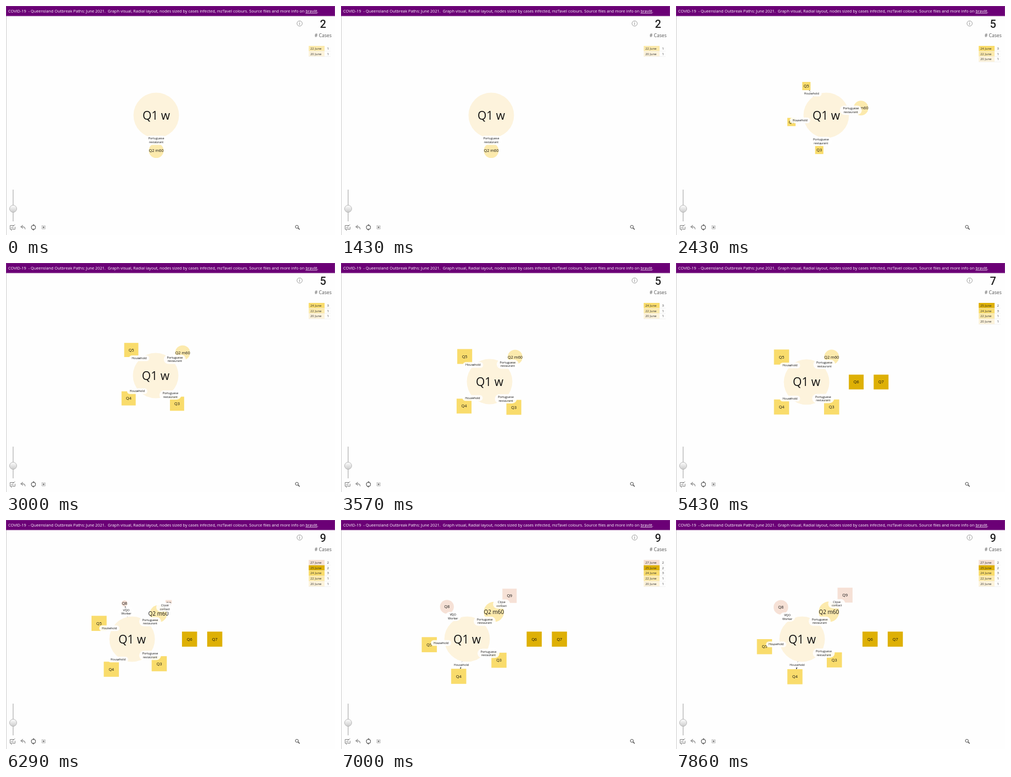
An HTML page for the animation above (8000 ms loop, 600x419 px).

```html
<!DOCTYPE html>
<html lang="en">
<head>
<meta charset="utf-8">
<title>Outbreak paths</title>
<style>
  html, body { margin: 0; width: 100%; height: 100%; overflow: hidden; background: #fefefe; }
  svg { display: block; width: 600px; height: 419px; font-family: "Open Sans", "Noto Sans", sans-serif; }
  .mid { text-anchor: middle; }
</style>
</head>
<body>
<svg id="stage" viewBox="0 0 600 419">
  <rect width="600" height="419" fill="#fefefe"/>
  <path d="M.5 18V419" stroke="#ccc"/>
  <g id="graph"></g>

  <rect x=".5" y=".5" width="599" height="17.5" fill="#6b0076" stroke="#7c2586"/>
  <text x="4" y="11.8" font-size="7.38" fill="#fff" xml:space="preserve">COVID-19&#160; - Queensland Outbreak Paths: June 2021.&#160; Graph visual, Radial layout, nodes sized by cases infected, mzTavel colours. Source files and more info on <tspan text-decoration="underline">bravlit</tspan>.</text>

  <text id="count" class="mid" x="578.3" y="40" font-family="Roboto, sans-serif" font-size="20" font-weight="500" fill="#222"></text>
  <text class="mid" x="578.3" y="57.3" font-size="8.6" fill="#555">#&#160;Cases</text>
  <g id="legend" font-size="5.9" fill="#333"></g>

  <defs>
    <linearGradient id="knob" x2="0" y2="1">
      <stop offset="0" stop-color="#fff"/><stop offset="1" stop-color="#ccc"/>
    </linearGradient>
  </defs>
  <path d="M13 336V394" stroke="#ccc" stroke-width="2"/>
  <circle cx="13" cy="371" r="6.5" fill="url(#knob)" stroke="#aaa" stroke-width=".8"/>

  <g fill="none" stroke="#777">
    <circle cx="535.5" cy="32" r="4.8" stroke-width=".7"/>
    <path d="M535.5 31v3.500M535.5 29v1" stroke-width=".8"/>
    <path d="M7.5 401.5h7M16.5 404v4.500h-5l-2 2v-2h-2v-7M9 406h5M11.500 404l5-4" stroke-width=".9"/>
    <path d="M31 401l-4 3 4 3M27.500 404h3q4 0 4.500 4.500" stroke="#999" stroke-width="1.3"/>
    <path d="M47 407.500a4 4 0 0 1 3-6.500M53 402.500a4 4 0 0 1-3 6.500M49 409a4 4 0 0 1-2-1.500M51 401a4 4 0 0 1 2 1.500" stroke="#555" stroke-width="1.2"/>
    <rect x="65.500" y="402" width="6" height="6" stroke="#999" stroke-dasharray="1.5 .8"/>
    <circle cx="530.500" cy="404" r="2.700" stroke="#444"/>
    <path d="M532.500 406l3 3" stroke="#444" stroke-width="1.4"/>
  </g>
  <path d="M49.500 399l2.500 2-2.500 2zM50.500 407l-2.500 2 2.500 2z" fill="#555"/>
  <rect x="67" y="403.500" width="3" height="3" fill="#888"/>
</svg>

<script>
const LOOP = 8000, FRAME = 1000 / 7, TAU = 290;
const starts = [-4000, 2200, 4300, 6130];
const counts = [2, 5, 7, 9];
const color = { d20: '#fdf3dc', d22: '#fceaad', d24: '#f9dc6c', d25: '#deb005', d27: '#f6e1d6' };

// Camera: centre of the first node and the span of each pan.
const pans = [
  { from: 2800, to: 3300, x: 271, y: 217 },
  { from: 5000, to: 5600, x: 230, y: 218 }
];

// Tracks hold one entry per step: a constant or [from, to].
const orbit = [64.6, , , [64.6, 70]];
const restaurant = ['Portuguese', 'restaurant'];
const nodes = [
  { text: 'Q1 w', birth: 0, fill: color.d20, round: true, size: [41.5], font: [21] },
  { text: 'Q2 m60', birth: 0, fill: color.d22, round: true, parent: 0, label: restaurant,
    angle: [90, [28, -45], , [-43, -45.7]], dist: orbit, size: [13.5, , , [13.5, 18.7]], font: [7.34, , , 10] },
  { text: 'Q3', birth: 1, fill: color.d24, parent: 0, label: restaurant,
    angle: [, [169, 45], , [49, 32.8]], dist: orbit, size: [, [0, 13.8]] },
  { text: 'Q4', birth: 1, fill: color.d24, parent: 0, label: ['Household'],
    angle: [, [210, 135], , [141.5, 100.7]], dist: orbit, size: [, [0, 13.8]] },
  { text: 'Q5', birth: 1, fill: color.d24, parent: 0, label: ['Household'],
    angle: [, [249, 225], , [232, 168.5]], dist: orbit, size: [, [0, 13.8]] },
  { text: 'Q6', birth: 2, fill: color.d25, parent: 0,
    angle: [0], dist: [, , [71, 91], [91, 124]], size: [, , [0, 13.8]] },
  { text: 'Q7', birth: 2, fill: color.d25, parent: 5,
    angle: [0], dist: [, , [11, 46]], size: [, , [0, 13.8]] },
  { text: 'Q8', birth: 3, fill: color.d27, round: true, parent: 0, label: ['VQO', 'Worker'],
    angle: [, , , [273.4, 236.3]], dist: orbit, size: [, , , [0, 13.3]] },
  { text: 'Q9', birth: 3, fill: color.d27, parent: 1, label: ['Close', 'contact'],
    angle: [-46], dist: [, , , [15.7, 42.4]], size: [, , , [0, 13.7]] }
];

const dates = [
  { text: '27 June', cases: 2, birth: 3, fill: color.d27 },
  { text: '25 June', cases: 2, birth: 2, fill: color.d25 },
  { text: '24 June', cases: 3, birth: 1, fill: color.d24 },
  { text: '22 June', cases: 1, birth: 0, fill: color.d22 },
  { text: '20 June', cases: 1, birth: 0, fill: color.d20 }
];

const $ = id => document.getElementById(id);

function make(parent, tag, attrs = {}, text) {
  const el = document.createElementNS('http://www.w3.org/2000/svg', tag);
  set(el, attrs);
  if (text !== undefined) el.textContent = text;
  return parent.appendChild(el);
}

function set(el, attrs) {
  for (const name in attrs) el.setAttribute(name, attrs[name]);
}

const show = (el, on) => { el.style.display = on ? '' : 'none'; };
const move = (x, y) => `translate(${x.toFixed(2)} ${y.toFixed(2)})`;

function track(values, step, t) {
  let s = step;
  while (values[s] === undefined) s--;
  const value = values[s];
  if (!Array.isArray(value)) return value;
  const [from, to] = value;
  return to + (from - to) * Math.exp(-(t - starts[s]) / TAU);
}

function camera(t) {
  let x = 274, y = 200;
  for (const pan of pans) {
    const p = Math.min(1, Math.max(0, (t - pan.from) / (pan.to - pan.from)));
    const k = p * p * (3 - 2 * p);
    x += (pan.x - x) * k;
    y += (pan.y - y) * k;
  }
  return { x, y };
}

function build() {
  const [discs, edges, labels] = [0, 0, 0].map(() => make($('graph'), 'g'));
  for (const node of nodes) {
    node.group = make(discs, 'g');
    node.shape = node.round
      ? make(node.group, 'circle', { r: 1, fill: node.fill })
      : make(node.group, 'rect', { x: -1, y: -1, width: 2, height: 2, fill: node.fill });
    node.caption = make(node.group, 'text', { class: 'mid', dy: '.36em', fill: '#111' }, node.text);
    if (!node.label) continue;

    node.edge = make(edges, 'g');
    node.line = make(node.edge, 'path', { stroke: '#555', 'stroke-width': .6 });
    node.head = make(node.edge, 'path', { d: 'M0 0L-4.5 -2.2V2.2Z', fill: '#111' });

    node.tag = make(labels, 'g', { 'font-size': 5.4 });
    const lines = node.label.length;
    const width = Math.max(...node.label.map(line => line.length)) * 2.9 + 11;
    const height = lines * 6.5 + 4;
    make(node.tag, 'rect', {
      x: -width / 2, y: -height / 2, width, height, rx: height / 2, fill: '#fff', 'fill-opacity': .88
    });
    node.label.forEach((line, i) => make(node.tag, 'text', {
      class: 'mid', y: (i - (lines - 1) / 2) * 6.5 + 1.9, fill: '#111'
    }, line));
  }
  for (const date of dates) {
    date.group = make($('legend'), 'g');
    make(date.group, 'rect', { x: 552, width: 29, height: 9.5, fill: date.fill });
    make(date.group, 'path', { d: 'M552 9.6H592', stroke: '#ddd', 'stroke-width': .4 });
    make(date.group, 'text', { x: 555, y: 6.9 }, date.text);
    make(date.group, 'text', { class: 'mid', x: 587.3, y: 6.9 }, date.cases);
  }
}

// Distance from a node's centre to its outline in the given direction.
function reach(node, angle) {
  return node.round ? node.r : node.r / Math.max(Math.abs(Math.cos(angle)), Math.abs(Math.sin(angle)));
}

function drawNode(node, step, t) {
  const on = step >= node.birth;
  for (const el of [node.group, node.edge, node.tag]) if (el) show(el, on);
  if (!on) return;

  node.r = track(node.size, step, t);
  const parent = nodes[node.parent];
  if (parent) {
    const angle = track(node.angle, step, t) * Math.PI / 180;
    const dist = track(node.dist, step, t);
    const along = d => [parent.x + d * Math.cos(angle), parent.y + d * Math.sin(angle)];
    [node.x, node.y] = along(dist);
    if (node.label) {
      const near = reach(parent, angle), far = dist - reach(node, angle);
      const tip = along(far);
      set(node.line, { d: `M${along(near)}L${tip}` });
      set(node.head, { transform: `${move(...tip)} rotate(${angle * 180 / Math.PI})` });
      set(node.tag, { transform: move(...along((near + far) / 2 - .5)) });
    }
  } else {
    Object.assign(node, camera(t));
  }
  set(node.group, { transform: move(node.x, node.y) });
  set(node.shape, { transform: `scale(${node.r})` });
  set(node.caption, { 'font-size': node.font ? track(node.font, step, t) : 7.34 });
}

function draw(t) {
  const step = starts.filter(start => t >= start).length - 1;
  nodes.forEach(node => drawNode(node, step, t));
  $('count').textContent = counts[step];
  let row = 0;
  for (const date of dates) {
    const on = step >= date.birth;
    show(date.group, on);
    if (on) set(date.group, { transform: move(0, 73 + 9.8 * row++) });
  }
}

build();
const origin = performance.now();

function tick() {
  const t = (performance.now() - origin) % LOOP;
  draw(Math.floor(t / FRAME) * FRAME);
  requestAnimationFrame(tick);
}
tick();
</script>
</body>
</html>
```
